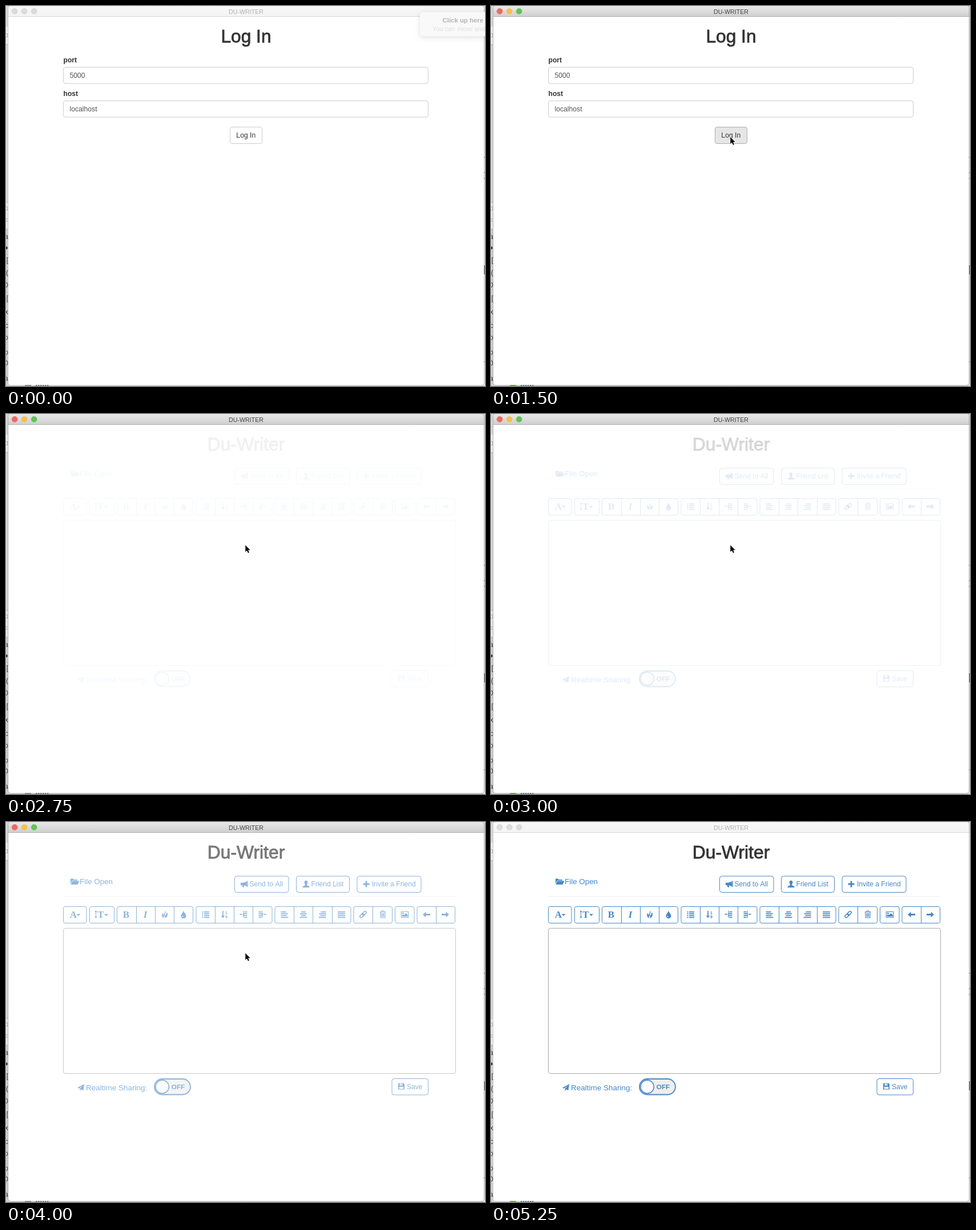
Recreate the animation shown at these times as an HTML page with a canvas. Size 839 px wide and 667 px high, loop 6 s.

```html
<!DOCTYPE html>
<html lang="en">
<head>
<meta charset="utf-8">
<title>Du-Writer</title>
<style>
html, body { margin: 0; width: 100%; height: 100%; overflow: hidden; background: #fff; }
canvas { display: block; }
</style>
</head>
<body>
<canvas id="stage" width="839" height="667"></canvas>
<script>
const ctx = document.getElementById('stage').getContext('2d');
const SANS = '"Liberation Sans", Arial, sans-serif';
const SERIF = '"Liberation Serif", serif';
const BLUE = '#4788c7';
const LOOP = 6000, STEP = 250;

function text(str, x, y, size, color, { style = '', align = 'left', family = SANS } = {}) {
  ctx.font = `${style} ${size}px ${family}`;
  ctx.textAlign = align;
  ctx.fillStyle = color;
  ctx.fillText(str, x, y);
}

function box(x1, y1, x2, y2, r, stroke, fill, width = 1) {
  ctx.beginPath();
  ctx.roundRect(x1, y1, x2 - x1, y2 - y1, r);
  if (fill) { ctx.fillStyle = fill; ctx.fill(); }
  if (stroke) { ctx.strokeStyle = stroke; ctx.lineWidth = width; ctx.stroke(); }
}

function rect(x, y, w, h, color) {
  ctx.fillStyle = color;
  ctx.fillRect(x, y, w, h);
}

function disc(x, y, r, fill, stroke, width = 1) {
  box(x - r, y - r, x + r, y + r, r, stroke, fill, width);
}

// Icon paths are relative to the icon centre.
function icon(x, y, fill, line, width = 1.5) {
  ctx.save();
  ctx.translate(x, y);
  ctx.fillStyle = ctx.strokeStyle = BLUE;
  ctx.lineWidth = width;
  if (fill) ctx.fill(new Path2D(fill), 'evenodd');
  if (line) ctx.stroke(new Path2D(line));
  ctx.restore();
}

function heading(str, size) {
  text(str, 420.5, 64, size, '#333', { align: 'center' });
  ctx.strokeStyle = '#333';
  ctx.lineWidth = 0.8;
  ctx.strokeText(str, 420.5, 64);
}

function desktop() {
  rect(0, 0, 839, 667, '#dadada');
  rect(0, 36, 4, 31, '#f1f1f1');
  rect(0, 345, 4, 47, '#ececec');
  rect(0, 392, 4, 275, '#d2d2d2');
  rect(0, 67, 4, 1, '#bbb');
  rect(0, 344, 4, 1, '#bbb');
  rect(0, 391, 4, 1, '#bbb');
  rect(837, 19, 2, 648, '#e9e9e9');
}

function scraps() {
  const bits = [[51, 'o'], [355, 'o'], [376, '<'], [405, 'a'], [424, '●'], [446, '['], [468, '('],
    [490, 'O'], [513, '['], [537, 'x'], [561, 'c'], [582, 'o'], [608, 'o'], [627, 'O'], [654, 'a']];
  ctx.save();
  ctx.beginPath();
  ctx.rect(0, 0, 4, 667);
  ctx.clip();
  for (const [y, ch] of bits)
    text(ch, 4, y + 4, 12, y < 400 ? '#aaa' : '#444', { align: 'right' });
  ctx.restore();
  for (const y of [265, 292, 302, 455, 624]) rect(837, y, 2, y === 455 ? 16 : 1, '#777');
  rect(33, 665, 11, 2, '#55b948');
  for (let x = 52; x < 73; x += 4) rect(x, 665, 2.5, 2, '#777');
}

function appWindow(active) {
  box(3.5, -0.5, 837.5, 666, 5, active ? '#a5a5a5' : '#c0c0c0', '#fff');
  const bar = ctx.createLinearGradient(0, 0, 0, 18);
  bar.addColorStop(0, active ? '#e9e9e9' : '#f8f8f8');
  bar.addColorStop(1, active ? '#d0d0d0' : '#f4f4f4');
  box(4, 0, 837, 18, [5, 5, 0, 0], null, bar);
  rect(4, 18, 833, 1, active ? '#b2b2b2' : '#d8d8d8');
  ['#ee6a5f', '#f5bf4f', '#61c454'].forEach((color, i) =>
    disc(15.2 + 17 * i, 9.3, 5, active ? color : '#dcdcdc', active ? color : '#d0d0d0', 0.6));
  text('DU-WRITER', 420.5, 13.5, 10.7, active ? '#424242' : '#b2b2b2', { align: 'center' });
  scraps();
}

function field(label, value, y) {
  text(label, 100.5, y - 8.5, 12.1, '#333', { style: 'bold' });
  box(100.5, y + 0.5, 739.5, y + 29, 3.5, '#ccc');
  text(value, 111.5, y + 19, 12.2, '#555');
}

function loginForm(hover, focus) {
  heading('Log In', 31.7);
  field('port', '5000', 107);
  field('host', 'localhost', 166);
  if (focus) box(391.5, 211.5, 449, 242, 4, 'rgba(90,145,235,.45)', null, 4);
  box(392.5, 212.5, 448.5, 241.5, 3.5, focus ? '#4f87dd' : hover ? '#adadad' : '#ccc',
    hover ? '#e6e6e6' : '#fff', focus ? 1.6 : 1);
  text('Log In', 420.3, 231.3, 12.2, '#333', { align: 'center' });
}

function button(x1, x2, y, label, textX) {
  box(x1, y, x2, y + 28.5, 4, BLUE);
  text(label, textX, y + 18.3, 12.1, BLUE);
}

function group(...edges) {
  box(edges[0], 148.5, edges.at(-1), 177.5, 3, BLUE);
  for (const x of edges.slice(1, -1)) rect(Math.floor(x), 148.5, 1, 29, BLUE);
}

// align: 0 left, 0.5 centre, 1 right
function bars(x, align, widths = [9, 12, 10, 13]) {
  widths.forEach((w, i) => rect(x - 6.5 + (13 - w) * align, 157 + 3.2 * i, w, 1.7, BLUE));
}

function dents(x, dir) {
  bars(x, dir > 0 ? 0 : 1, [5, 7, 7, 5]);
  rect(x - 0.5, 155.5, 1, 13, BLUE);
  icon(x, 162, dir > 0 ? 'M2 -.8H6.5V.8H2Z' : 'M-6.5 -.8H-2V.8H-6.5Z');
}

function arrow(x, dir) {
  icon(x, 162.5, `M${6.5 * dir} 0L${1 * dir} -5V-1.4H${-6.5 * dir}V1.4H${1 * dir}V5Z`);
}

function toolbar() {
  group(100.5, 141);
  group(146.5, 189.5);
  group(194.5, 228.5, 261.5, 294.5, 327.5);
  group(333, 366.5, 399.5, 432.5, 466);
  group(471, 504.5, 537.5, 571, 604);
  group(609, 642.5, 676.5);
  group(681.5, 715);
  group(720, 753.5, 786.5);

  const letter = (ch, x, style, size = 17) =>
    text(ch, x, 168, size, BLUE, { style, align: 'center', family: SERIF });
  letter('A', 118, 'bold');
  letter('T', 166, 'bold');
  letter('B', 210.5, 'bold');
  letter('I', 244, 'italic bold');
  icon(157.5, 162, 'M0 -7L2 -4H-2ZM0 7L2 4H-2Z', 'M0 -5V5', 1);
  for (const x of [127, 175.5]) icon(x, 163, 'M-3.5 -1.5H3.5L0 2Z');

  icon(278, 162.5, 'M1 -7C3 -3 -1 -1 1 2C3 1 2 -1 4 -4C6 0 5 5 0 6.5C2 4 0 3 -1 1C-1 3 -2 4 -1 6.5C-5 4 -6 0 -3 -3C-3 -1 -2 0 -2 1C0 -2 0 -4 1 -7Z');
  icon(311, 162.5, 'M0 -7C1 -3 4.5 -1 4.5 2.2A4.5 4.5 0 0 1 -4.5 2.2C-4.5 -1 -1 -3 0 -7ZM-2.8 2A2.5 2.5 0 0 0 -.5 4.6V3.5A2 2 0 0 1 -1.8 2Z');

  for (let i = 0; i < 4; i++) {
    rect(343.5, 157 + 3.2 * i, 2, 1.8, BLUE);
    rect(347, 157 + 3.2 * i, 9, 1.8, BLUE);
  }
  icon(380, 162, 'M0 6.5L-3.2 2.5H3.2Z', 'M0 -6V4', 1.7);
  text('1', 384, 161.5, 7, BLUE, { style: 'bold' });
  text('9', 384, 168.5, 7, BLUE, { style: 'bold' });
  dents(416, -1);
  dents(449, 1);
  bars(488, 0);
  bars(521, 0.5, [8, 12, 9, 13]);
  bars(554, 1);
  bars(587.5, 0, [13, 13, 13, 13]);

  ctx.save();
  ctx.translate(625.5, 162.3);
  ctx.rotate(-Math.PI / 4);
  box(-7, -2.2, 0.8, 2.2, 2.2, BLUE, null, 1.5);
  box(-0.8, -2.2, 7, 2.2, 2.2, BLUE, null, 1.5);
  ctx.restore();
  icon(660, 162, null, 'M-5.5 -4H5.5M-2 -4V-6H2V-4M-4 -4V6H4V-4M-1.8 -2V4.5M0 -2V4.5M1.8 -2V4.5', 1.1);
  icon(698.5, 162.5, 'M-5 3.5V1.5L-3 -.5L-1.5 1L2 -2.5L5 .5V3.5ZM-4.5 -3.5H-2V-1H-4.5Z', 'M-6.2 -5H6.2V5H-6.2Z', 1.1);
  arrow(736.5, -1);
  arrow(769.5, 1);
}

function editor() {
  heading('Du-Writer', 31.8);
  icon(120.5, 104.5, 'M-7.5 4V-5H-3L-2 -3.5H4.5V-1.8H-4.5ZM-4 -1H8L5 5.2H-7.2Z');
  text('File Open', 129, 109.3, 13.4, BLUE);
  button(400.5, 495, 95, 'Send to All', 426.5);
  icon(417.5, 109, 'M-6.5 -2.5H-2C1 -3 3 -4 5 -5.5V5C3 3.5 1 2.5 -1 2.3L0 5.5H-3L-4 2H-6.5ZM5.6 -5.5H6.5V5H5.6Z');
  button(508.5, 601.5, 95, 'Friend List', 534.5);
  icon(525.5, 109, 'M0 -6.2C4 -6.2 3.2 -1 1.5 .5V2C4 3 6 3.5 6 6H-6C-6 3.5 -4 3 -1.5 2V.5C-3.2 -1 -4 -6.2 0 -6.2Z');
  button(615, 727, 95, 'Invite a Friend', 641);
  icon(631, 109, null, 'M-5.5 0H5.5M0 -5.5V5.5', 2.8);
  rect(101, 130, 686, 1, '#eee');

  toolbar();
  box(100.5, 186.5, 787.5, 441.5, 3.5, '#a9a9a9');

  icon(131, 466, 'M6 -6L4.5 5L.5 3.2L-1.5 6V2.2L4 -4L-3 1.8L-6 .6Z');
  text('Realtime Sharing:', 140, 471, 13.5, BLUE);
  box(260, 451, 323, 478.5, 13.75, BLUE, '#eee', 1.8);
  disc(273.7, 464.7, 11.6, '#fff', BLUE, 1.6);
  text('OFF', 289.7, 469, 11.8, BLUE, { style: 'bold' });
  button(676, 739.5, 450.5, 'Save', 702);
  icon(692.5, 464, 'M-5.5 -5.5H4L5.5 -4V5.5H-5.5ZM-3 -4.8H2.5V-1.5H-3ZM-3.8 .8H3.8V4.6H-3.8ZM.6 -4.5H1.8V-2.2H.6Z');
}

function notice() {
  ctx.save();
  ctx.shadowColor = 'rgba(0,0,0,.13)';
  ctx.shadowBlur = 9;
  ctx.shadowOffsetY = 2;
  box(725, 10.5, 850, 53, 5, null, '#f9f9f9');
  ctx.restore();
  text('Click up here', 764.5, 29, 11.4, '#b4b4b4', { style: 'bold' });
  text('You can move and resize', 747, 44, 11.2, '#dedede');
}

function cursor(x, y) {
  const shape = new Path2D('M0 0V11.8L2.7 9.3L4.7 13.6L6.6 12.8L4.7 8.5H8.4Z');
  ctx.save();
  ctx.translate(x, y);
  ctx.strokeStyle = '#fff';
  ctx.lineWidth = 1.6;
  ctx.stroke(shape);
  ctx.fillStyle = '#000';
  ctx.fill(shape);
  ctx.restore();
}

function draw(t) {
  ctx.globalAlpha = 1;
  desktop();
  appWindow(t >= 1500 && t < 5250);

  if (t < 2750) {
    ctx.globalAlpha = t < 2500 ? 1 : 0.3;
    loginForm(t >= 1500, t >= 2250);
  } else {
    ctx.globalAlpha = Math.min(1, (t - 2620) / 2230);
    editor();
  }

  ctx.globalAlpha = 1;
  if (t < 250) notice();
  else if (t < 500) cursor(527.5, 236);
  else if (t < 750) cursor(455, 236);
  else if (t < 1000) cursor(420, 231);
  else if (t < 5250) cursor(419.3, 230.3);
}

function tick() {
  draw(Math.floor(performance.now() % LOOP / STEP) * STEP);
  requestAnimationFrame(tick);
}
tick();
</script>
</body>
</html>
```
